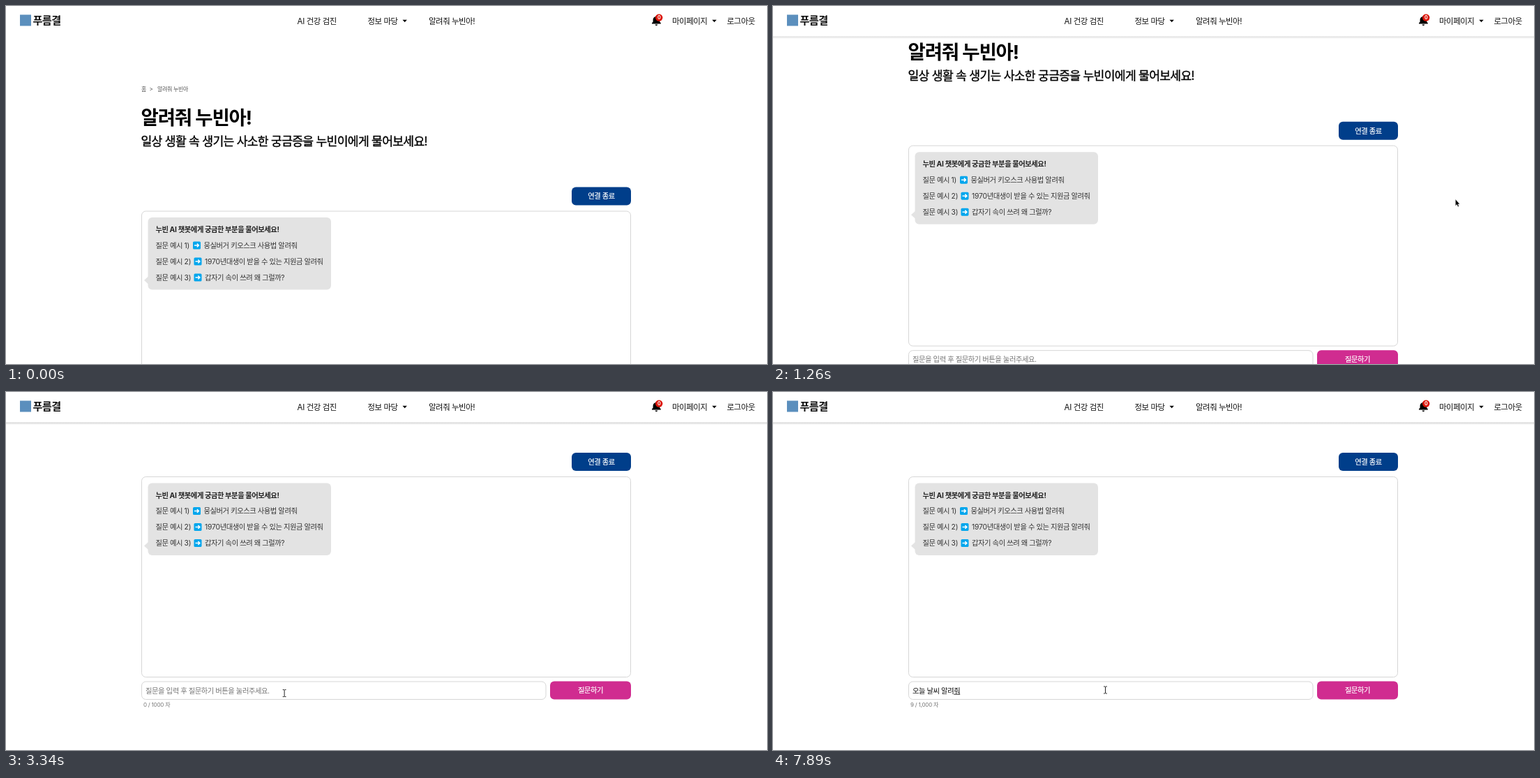
An HTML page for the animation above (8000 ms loop, 1091 px wide and 513 px high).

```html
<!DOCTYPE html>
<html lang="ko">
<head>
<meta charset="utf-8">
<title>챗봇 화면</title>
<style>
  html, body { margin: 0; width: 100%; height: 100%; overflow: hidden; background: #fff; }
  svg { display: block; width: 1091px; height: 513px; }
  text { font-family: Inter, "Noto Sans CJK KR", "Noto Sans CJK", sans-serif; white-space: pre; letter-spacing: -0.02em; }
  .ko { letter-spacing: -0.042em; }
</style>
</head>
<body>
<svg viewBox="0 0 1091 513" xmlns="http://www.w3.org/2000/svg">
  <defs>
    <linearGradient id="fade" x1="0" y1="0" x2="0" y2="1">
      <stop offset="0" stop-color="#000" stop-opacity=".2"/>
      <stop offset="1" stop-color="#000" stop-opacity="0"/>
    </linearGradient>
  </defs>
  <g id="page"></g>
  <g id="header"></g>
  <path id="arrow" d="M0 0V9.6L2.1 7.7L3.6 11L5.2 10.3L3.8 7.1H6.4Z" stroke="#fff" stroke-width=".5"/>
  <path id="beam" d="M-2.4 -5H-.6L0 -4.4L.6 -5H2.4M0 -4.4V4.4M-2.4 5H-.6L0 4.4L.6 5H2.4" fill="none" stroke="#222"/>
</svg>
<script>
const LOOP = 8000;
const $ = id => document.getElementById(id);

// Hangul and spaces are set tighter than Latin.
const runs = str => str.replace(/[가-힣ㄱ-ㅎ ]+/g, m => `<tspan class="ko">${m}</tspan>`);

// y is the optical middle of the line; medium is regular weight with a hairline outline.
function label(x, y, size, str, { fill = '#111', weight = 400, medium = false, anchor = 'start', id } = {}) {
  const outline = medium ? `stroke="${fill}" stroke-width="${size * 0.02}"` : '';
  return `<text ${id ? `id="${id}"` : ''} x="${x}" y="${y + size * 0.375}" font-size="${size}" ` +
    `font-weight="${weight}" fill="${fill}" text-anchor="${anchor}" ${outline}>${runs(str)}</text>`;
}

function box(x, y, w, h, fill, stroke = 'none') {
  return `<rect x="${x}" y="${y}" width="${w}" height="${h}" rx="6" fill="${fill}" stroke="${stroke}"/>`;
}

const button = (x, y, w, fill, str) => box(x, y, w, 26, fill) +
  label(x + w / 2, y + 13, 10.3, str, { fill: '#fff', medium: true, anchor: 'middle' });

const example = (y, n, iconX, str) => label(214.5, y, 10.3, `질문 예시 ${n})`, { fill: '#333' }) +
  `<g transform="translate(${iconX} ${y - 5.5})">
     <rect width="11" height="11" rx="1.6" fill="#00a6ed"/>
     <path d="M2 5.5H8M5.8 3L8.4 5.5L5.8 8" fill="none" stroke="#fff" stroke-width="1.5"/>
   </g>` + label(iconX + 15.5, y, 10.3, str, { fill: '#333' });

const dropMark = x => `<path d="M${x} 19.8h6.4l-3.2 3.5Z"/>`;

$('page').innerHTML =
  label(194, 118.5, 8, '홈', { fill: '#555' }) +
  label(205.5, 118.5, 8, '>', { fill: '#555' }) +
  label(217, 118.5, 8, '알려줘 누빈아', { fill: '#555' }) +
  label(193.5, 159.5, 27.5, '알려줘 누빈아!', { weight: 700, fill: '#000' }) +
  label(193.5, 193.5, 17.2, '일상 생활 속 생기는 사소한 궁금증을 누빈이에게 물어보세요!', { medium: true, fill: '#000' }) +
  button(811, 259.5, 85, '#003e8a', '연결 종료') +
  box(194.5, 294, 701, 287, '#fff', '#d6d6d6') +
  box(203.5, 303, 262.5, 103.5, '#e3e3e3') +
  '<path d="M204 387.5L198 393L204 398.5Z" fill="#e3e3e3"/>' +
  label(214.5, 320.2, 10.3, '누빈 AI 챗봇에게 궁금한 부분을 물어보세요!', { weight: 700, fill: '#222' }) +
  example(343, 1, 268, '뭉실버거 키오스크 사용법 알려줘') +
  example(366, 2, 269.5, '1970년대생이 받을 수 있는 지원금 알려줘') +
  example(389, 3, 269.5, '갑자기 속이 쓰려 왜 그럴까?') +
  box(194.5, 587.5, 579.5, 25.5, '#fff', '#d6d6d6') +
  label(200, 600.2, 10.3, '질문을 입력 후 질문하기 버튼을 눌러주세요.', { fill: '#757575', id: 'hint' }) +
  label(200, 600.2, 10.3, '', { id: 'typed' }) +
  '<rect id="underline" y="605.2" height=".9" fill="#111"/>' +
  '<rect id="caret" y="594" width="1" height="12.5" fill="#111"/>' +
  label(197, 620, 8, '', { fill: '#777', id: 'count' }) +
  button(780, 587, 116, '#d02c90', '질문하기');

$('header').innerHTML =
  '<rect id="shadow" y="43" width="1091" height="4" fill="url(#fade)"/>' +
  '<rect width="1091" height="43.5" fill="#fff"/>' +
  '<rect x="20" y="12.5" width="16" height="16" fill="#5b8fbd"/>' +
  label(38.5, 20.3, 15.2, '푸름결', { weight: 700 }) +
  label(417.5, 21.2, 11.47, 'AI 건강 검진') +
  label(518.5, 21.2, 11.47, '정보 마당') + dropMark(568.5) +
  label(606, 21.2, 11.47, '알려줘 누빈아!') +
  '<path d="M926 25.6V24.6L927.6 22.6V19.6Q927.8 16 931.3 15.2Q931.4 14 932.4 14Q933.4 14 933.5 15.2Q937 16 937.2 19.6V22.6L938.8 24.6V25.6ZM930.6 26.4H934.2Q934 28.2 932.4 28.2Q930.8 28.2 930.6 26.4Z"/>' +
  '<circle cx="936.2" cy="16.6" r="5.2" fill="#dc1405"/>' +
  label(936.2, 16.5, 7, '0', { weight: 700, fill: '#fff', anchor: 'middle' }) +
  label(955, 21.2, 11.47, '마이페이지') + dropMark(1012.3) +
  label(1033.5, 21.2, 11.47, '로그아웃');

const clamp = v => Math.min(1, Math.max(0, v));
const smooth = p => p * p * (3 - 2 * p);

// Each wheel notch moves the page by the same distance.
const NOTCH = 57.5;
const notches = [[905, 230], [1122, 236], [1965, 226]];
const scrollAt = t => notches.reduce((sum, [at, dur]) => sum + NOTCH * smooth(clamp((t - at) / dur)), 0);

// Pointer stops: time, x, y.
const stops = [
  [90, 1066, 487], [420, 983, 278.5], [700, 983, 278.5], [760, 978.3, 276.8],
  [2210, 978.3, 276.8], [2610, 868, 516], [2740, 851, 516], [2860, 805, 492],
  [3150, 520, 436], [3510, 298.5, 428], [3600, 298.5, 428], [3630, 298.5, 430],
  [6740, 298.5, 430], [6920, 390, 438.5], [7170, 535, 416], [7470, 476.5, 427]
];

function pointerAt(t) {
  const i = stops.findIndex(s => s[0] > t);
  if (i < 0) return stops[stops.length - 1].slice(1);
  const [t0, x0, y0] = stops[Math.max(0, i - 1)], [t1, x1, y1] = stops[i];
  const p = smooth(clamp((t - t0) / (t1 - t0 || 1)));
  return [x0 + (x1 - x0) * p, y0 + (y1 - y0) * p];
}

// Keystrokes as the input method composes them, starting with the focus click.
const BLINK = 530;
const keys = [
  [3470, ''], [4130, 'ㅇ'], [4230, '오'], [4570, '온'], [4630, '오느'], [4720, '오늘'], [4800, '오늘 '],
  [4880, '오늘 ㄴ'], [4970, '오늘 나'], [5090, '오늘 날'], [5310, '오늘 날ㅆ'], [5460, '오늘 날씨'],
  [5560, '오늘 날씨 '], [5650, '오늘 날씨 ㅇ'], [5730, '오늘 날씨 아'], [5800, '오늘 날씨 알'],
  [5880, '오늘 날씨 알ㄹ'], [5930, '오늘 날씨 알려'], [6040, '오늘 날씨 알려ㅈ'],
  [6130, '오늘 날씨 알려주'], [6220, '오늘 날씨 알려줘'], [6300, '오늘 날씨 알려줘']
];

const show = (el, on) => el.setAttribute('visibility', on ? 'visible' : 'hidden');

function drawInput(t) {
  const key = keys.filter(k => k[0] <= t).pop();
  const value = key ? key[1] : '';
  const typed = $('typed'), caret = $('caret'), underline = $('underline');
  typed.innerHTML = runs(value);
  show($('hint'), !value);
  $('count').innerHTML = runs(`${value.length} / ${value ? '1,000' : '1000'} 자`);

  const end = value ? typed.getComputedTextLength() : 0;
  const from = value.length > 1 ? typed.getSubStringLength(0, value.length - 1) : 0;
  underline.setAttribute('x', 200 + from);
  underline.setAttribute('width', Math.max(0, end - from));
  show(underline, value && !value.endsWith(' '));
  caret.setAttribute('x', Math.round(200 + end));
  show(caret, key && Math.floor((t - key[0]) / BLINK) % 2 === 0);
}

function drawPointer(t) {
  const [x, y] = pointerAt(t);
  const overInput = t > 2750 && x > 194 && x < 774 && y > 415 && y < 441;
  for (const id of ['arrow', 'beam']) {
    $(id).setAttribute('transform', `translate(${x} ${y})`);
    show($(id), t >= 90 && (id === 'beam') === overInput);
  }
}

function render(t) {
  $('page').setAttribute('transform', `translate(0 ${-scrollAt(t)})`);
  $('shadow').setAttribute('opacity', clamp((t - 920) / 440));
  drawInput(t);
  drawPointer(t);
}

function tick() {
  render(performance.now() % LOOP);
  requestAnimationFrame(tick);
}
tick();
</script>
</body>
</html>
```
